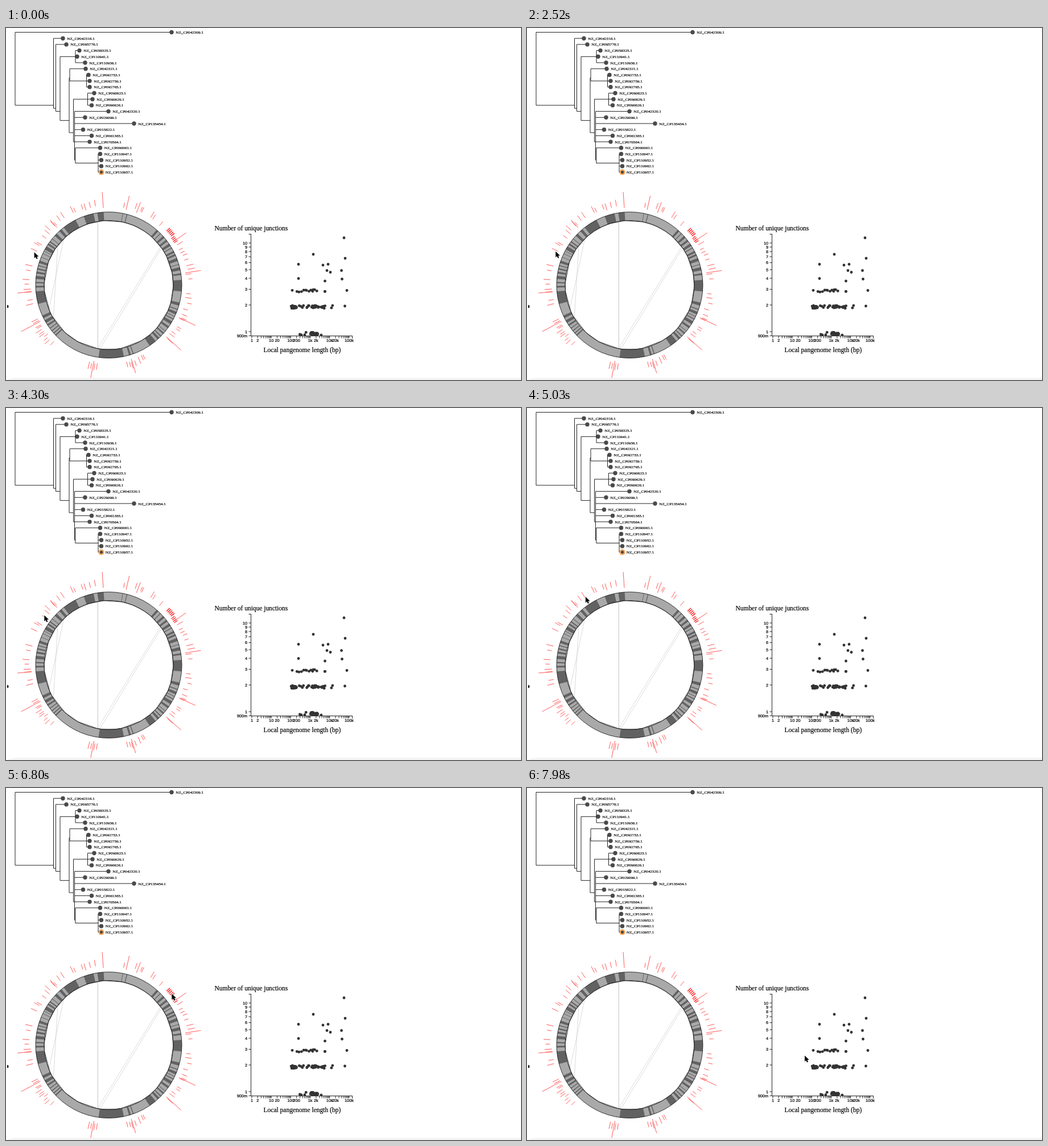
Write an HTML page with a canvas that moves like this. It is 905x619 px and loops after 8 s.

```html
<!DOCTYPE html>
<html lang="en">
<head>
<meta charset="utf-8">
<title>Pangenome explorer</title>
<style>
html, body { margin: 0; width: 100%; height: 100%; overflow: hidden; background: #fff; }
canvas { display: block; width: 905px; height: 619px; }
</style>
</head>
<body>
<canvas id="stage" width="905" height="619"></canvas>
<script>
const stage = document.getElementById('stage');
const W = 905, H = 619, LOOP = 8000;
const SERIF = '"Liberation Serif", "Times New Roman", serif';
const SANS = '"Liberation Sans", Arial, sans-serif';
const RED = '#ff3030';
let g = stage.getContext('2d');

const rowY = i => 7.5 + i * 10.7;

function line(x1, y1, x2, y2, color = '#222', width = 1) {
  g.strokeStyle = color;
  g.lineWidth = width;
  g.beginPath();
  g.moveTo(x1, y1);
  g.lineTo(x2, y2);
  g.stroke();
}

function dot(x, y, r, color) {
  g.fillStyle = color;
  g.beginPath();
  g.arc(x, y, r, 0, 7);
  g.fill();
}

// A hairline stroke gives the slightly heavy look of the lettering.
function text(s, x, y, size, family = SERIF, align = 'left') {
  g.font = `${size}px ${family}`;
  g.textAlign = align;
  g.fillStyle = g.strokeStyle = '#000';
  g.lineWidth = 0.2;
  g.fillText(s, x, y);
  g.strokeText(s, x, y);
}

function seeded(seed) {
  return () => (seed = (seed * 16807) % 2147483647) / 2147483647;
}

// ---- tree ----
// leaf: [accession, x]; fork: [x, ...children]
const tree = [16, ['042309', 291],
  [83.5, ['042318', 100],
    [87.5, ['095776', 106],
      [95,
        [122, ['058325', 129], ['110941', 125], ['110936', 139]],
        [111,
          [112, ['042321', 140],
            [141.5, ['092753', 145], ['092759', 147], ['092765', 147]]],
          [118.5,
            [143.5, ['090623', 155], ['090629', 152], ['090626', 150.5]],
            [120.5, ['042320', 180], ['029099', 139], ['135454', 225],
              ['015822', 135.5], ['061385', 150.5], ['070564', 147],
              [121.8, ['090061', 165.5],
                [162, ['110947', 165.5], ['110952', 167.5],
                  ['110962', 167.5], ['110957', 167.5]]]]]]]]]];

function drawLeaf(id, x, y) {
  const selected = id === '110957';
  dot(x, y, selected ? 5 : 3.7, selected ? '#f7a456' : '#4a4a4a');
  if (selected) dot(x, y, 2.5, '#444');
  text(`NZ_CP${id}.1`, x + 7.3, y + 2.5, 7.15);
}

// Each fork sits halfway between its first and last leaf.
function drawTree() {
  let row = 0;
  const drawNode = (node, parentX) => {
    const [head, ...rest] = node;
    if (typeof head === 'string') {
      const y = rowY(row++);
      line(parentX, y, rest[0], y);
      drawLeaf(head, rest[0], y);
      return y;
    }
    const first = row;
    const ys = rest.map(child => drawNode(child, head));
    const y = rowY((first + row - 1) / 2);
    line(parentX, y, head, y);
    line(head, ys[0], head, ys.at(-1));
    return y;
  };
  drawNode(tree, tree[0]);
}

// ---- genome ring ----
const CX = 180.5, CY = 452, R_OUT = 128.5, R_IN = 113.5;
const rad = deg => (deg - 90) * Math.PI / 180;
const polar = (deg, r) => [CX + r * Math.cos(rad(deg)), CY + r * Math.sin(rad(deg))];

// all in degrees clockwise from the top
const darkBlocks = [[-38, -27], [-20, -12], [-9, -4], [86, 95], [140, 146], [168, 188], [255, 265]];
const stripeZones = [[11, 15], [41, 84], [104, 138], [160, 166], [226, 247], [268, 320]];
const links = [[350, 190], [350.5, 189.5], [53.5, 190], [55, 188], [308, 239], [316, 248]];
// angle, length
const spikes = [[-42, 18], [-4, 28], [13, 25], [21, 20], [56, 28], [81, 28],
  [115, 32], [132, 35], [163, 26], [191, 37], [242, 38], [265, 25]];
// from, to, count
const tickZones = [[-45, -7, 10], [10, 42, 7], [58, 86, 9], [96, 134, 12],
  [153, 168, 7], [187, 194, 4], [224, 245, 11], [255, 285, 8], [293, 316, 6]];

function arcBlock(a, b, color) {
  g.fillStyle = color;
  g.beginPath();
  g.arc(CX, CY, R_OUT, rad(a), rad(b));
  g.arc(CX, CY, R_IN, rad(b), rad(a), true);
  g.fill();
}

function spoke(deg, r0, r1, color = RED, width = 0.8) {
  line(...polar(deg, r0), ...polar(deg, r1), color, width);
}

function drawRing() {
  const rnd = seeded(7);
  for (const [a, b] of links)
    line(...polar(a, R_IN), ...polar(b, R_IN), '#d2d2d2', 0.8);

  arcBlock(0, 360, '#a9a9a9');
  for (const [a, b] of darkBlocks) arcBlock(a, b, '#626262');
  for (const [a, b] of stripeZones)
    for (let d = a; d < b; d += 1 + 2 * rnd()) {
      const end = Math.min(b, d + 0.4 + 2.4 * rnd() ** 2);
      arcBlock(d, end, '#626262');
      d = end;
    }

  g.strokeStyle = '#222';
  g.lineWidth = 0.9;
  for (const r of [R_OUT, R_IN]) {
    g.beginPath();
    g.arc(CX, CY, r, 0, 7);
    g.stroke();
  }
  g.beginPath();
  for (let d = -4; d < 356; d += 4 + 16 * rnd()) g.lineTo(...polar(d, R_IN));
  g.closePath();
  g.stroke();

  for (const [deg, len] of spikes) spoke(deg, 136, 136 + len);
  for (const [a, b, n] of tickZones)
    for (let i = 0; i < n; i++) {
      const r = 136 + 6 * rnd();
      spoke(a + (b - a) * (i + rnd()) / n, r, r + 7 + 6 * rnd());
    }
  for (let d = 47; d < 52; d += 1.2) spoke(d, 139, 147, '#ff1010', 1.4);
  for (let d = 53.5; d < 58; d += 1.2) spoke(d, 137, 144, '#ff1010', 1.2);
}

// ---- scatter plot ----
const AXIS = 430.5;
const plotX = v => 432 + 34.2 * Math.log10(v);
const plotY = v => 534 - 156 * Math.log10(v);

const outliers = [[594, 369], [540, 398], [596, 405], [514, 415.5], [557, 417],
  [566, 415.5], [564, 426.5], [570, 429.5], [589.5, 426.5], [514, 440.5],
  [590.5, 441.5], [560.5, 445], [599, 461.5], [595.5, 489]];
// junctions, x range, count
const clusters = [[2.9, 503, 532, 7], [2.9, 532, 547, 6], [2.9, 560, 561, 2],
  [1.9, 501, 511, 16], [1.9, 515, 523, 4], [1.9, 528, 533, 4], [1.9, 537, 550, 18],
  [1.9, 553, 562, 6], [1.9, 571, 575, 2], [0.95, 515, 529, 4], [0.95, 535, 548, 18],
  [0.95, 553, 554, 1]];

function drawPlot() {
  line(AXIS, 362, AXIS, 541.5);
  line(AXIS, 541.5, 609, 541.5);
  line(AXIS - 4, 362.5, AXIS, 362.5);
  line(608.5, 541, 608.5, 546);
  for (let v = 0.9; v < 10.5; v = Math.floor(v + 1)) {
    const y = plotY(v);
    line(AXIS - 4, y, AXIS, y);
    text(v < 1 ? '900m' : v, 424, y + 2.7, 7.3, SANS, 'right');
  }
  for (let p = 0; p < 6; p++)
    for (let m = 1; m < 10; m++) {
      const v = m * 10 ** p, x = plotX(v);
      if (v > 140000) continue;
      line(x, 541, x, 545.5);
      if (m < 3) text(v < 1000 ? v : v / 1000 + 'k', x, 551.5, 7.4, SANS, 'center');
    }
  text('Number of unique junctions', 366.5, 356, 11.45);
  text('Local pangenome length (bp)', 452.5, 570, 11.5);

  const rnd = seeded(41);
  for (const [x, y] of outliers) dot(x, y, 2.4, '#333');
  for (const [v, x0, x1, n] of clusters)
    for (let i = 0; i < n; i++)
      dot(x0 + (x1 - x0) * (i + rnd()) / n, plotY(v) + 5 * (rnd() - 0.5), 2.4, '#333');
}

// ---- hover charts ----
const LEFT = 359.3, RIGHT = 630.7;
const GRAY = '#939393';
// each row: [right edge, colour] from left to right
const longRow = [[565.8, '#d95f02'], [568, GRAY], [570.5, '#7cc4ea'], [RIGHT, GRAY]];
const shortRow = [[565.8, '#d95f02'], [626, GRAY]];
const pinkRow = [[388, '#fcb0e2'], [405.3, GRAY], [RIGHT, '#efe034']];

const orangeChart = {
  row: i => [0, 1, 6, 13].includes(i) ? shortRow : longRow,
  broken: [3, 4, 5], unit: 5, gap: 20.03, last: 65, mark: 294, point: [538, 464]
};
const pinkChart = {
  row: () => pinkRow,
  broken: [17], unit: 2, gap: 18.9, last: 28, mark: 53.5, point: [544, 490]
};

function drawChart(chart) {
  for (let i = 0; i < 24; i++) {
    if (chart.broken.includes(i)) {
      text('structural change between blocks', LEFT, rowY(i) + 4.7, 11.15);
      continue;
    }
    let x = LEFT;
    for (const [end, color] of chart.row(i)) {
      g.fillStyle = color;
      g.fillRect(x, rowY(i) - 4.3, end - x, 8.5);
      x = end;
    }
  }
  line(359, 259.5, 631, 259.5);
  line(RIGHT, 259, RIGHT, 263);
  for (let v = 0; v <= chart.last; v += chart.unit) {
    const x = 359.5 + v / chart.unit * chart.gap;
    line(x, 259, x, 263);
    text(v + 'k', x, 271, 7.6, SANS, 'center');
  }
}

// ---- time ----
// The pointer follows the ring (time, angle), then heads for the plot.
const sweep = [[0, -66.2], [300, -66.5], [2230, -66.5], [3700, -57.3], [4450, -51],
  [5030, -33], [5620, 28], [6360, 48], [7100, 52.8], [7250, 53.5]];
const EXIT = 7250, EXIT_END = 7980, GOAL = [488, 470.5];
// start, end, chart
const hovers = [[600, 2230, orangeChart], [2520, 2810, pinkChart], [3990, 4290, pinkChart],
  [5170, 5320, orangeChart], [6500, 6790, pinkChart], [6940, EXIT, pinkChart]];

// The picture advances in held steps.
function held(t) {
  const step = (from, len) => from + Math.floor((t - from + 1) / len) * len;
  if (t < 300) return 0;
  if (t < 600) return 300;
  if (t < 1630) return step(600, 1030 / 7);
  if (t < 2230) return 1630;
  return step(2230, 5750 / 39);
}

const mix = (a, b, k) => a + (b - a) * k;

function pointerAt(t) {
  const end = Math.max(1, sweep.findIndex(([time]) => time >= t));
  const [[t0, a0], [t1, a1]] = t < EXIT ? [sweep[end - 1], sweep[end]] : sweep.slice(-2);
  const [x, y] = polar(mix(a0, a1, Math.min(1, (t - t0) / (t1 - t0))), 143);
  const k = Math.min(1, Math.max(0, (t - EXIT) / (EXIT_END - EXIT)));
  return [mix(x, GOAL[0], k), mix(y, GOAL[1], k)];
}

function drawPointer(x, y) {
  const shape = [[0, 0], [0, 10.5], [2.4, 8.4], [4, 12], [6, 11.1], [4.5, 7.7], [7.7, 7.5]];
  g.beginPath();
  for (const [dx, dy] of shape) g.lineTo(x + dx, y + dy);
  g.closePath();
  g.fillStyle = '#000';
  g.strokeStyle = '#fff';
  g.lineWidth = 1.4;
  g.stroke();
  g.fill();
}

function drawPage() {
  g.fillStyle = '#fff';
  g.fillRect(0, 0, W, H);
  drawTree();
  drawRing();
  drawPlot();
  g.fillStyle = '#111';
  g.beginPath();
  g.ellipse(2, 489.7, 2.5, 2.7, 0, -Math.PI / 2, Math.PI / 2);
  g.fill();
  g.fillStyle = '#f4f4f4';
  g.beginPath();
  g.moveTo(2, H);
  g.quadraticCurveTo(9, 615, 20, 615);
  g.lineTo(W, 615);
  g.lineTo(W, H);
  g.fill();
}

// The still parts are painted once.
const page = document.createElement('canvas');
page.width = W;
page.height = H;
const screen2d = g;
g = page.getContext('2d');
drawPage();
g = screen2d;

function frame(now) {
  const t = held(now % LOOP);
  g.drawImage(page, 0, 0);
  const hover = hovers.find(([a, b]) => t >= a && t < b);
  if (hover) {
    const chart = hover[2];
    drawChart(chart);
    spoke(chart.mark, 137, 151, '#ff1010', 2.6);
    dot(...chart.point, 2.7, '#d8182a');
  }
  drawPointer(...pointerAt(t));
  requestAnimationFrame(frame);
}
requestAnimationFrame(frame);
</script>
</body>
</html>
```
